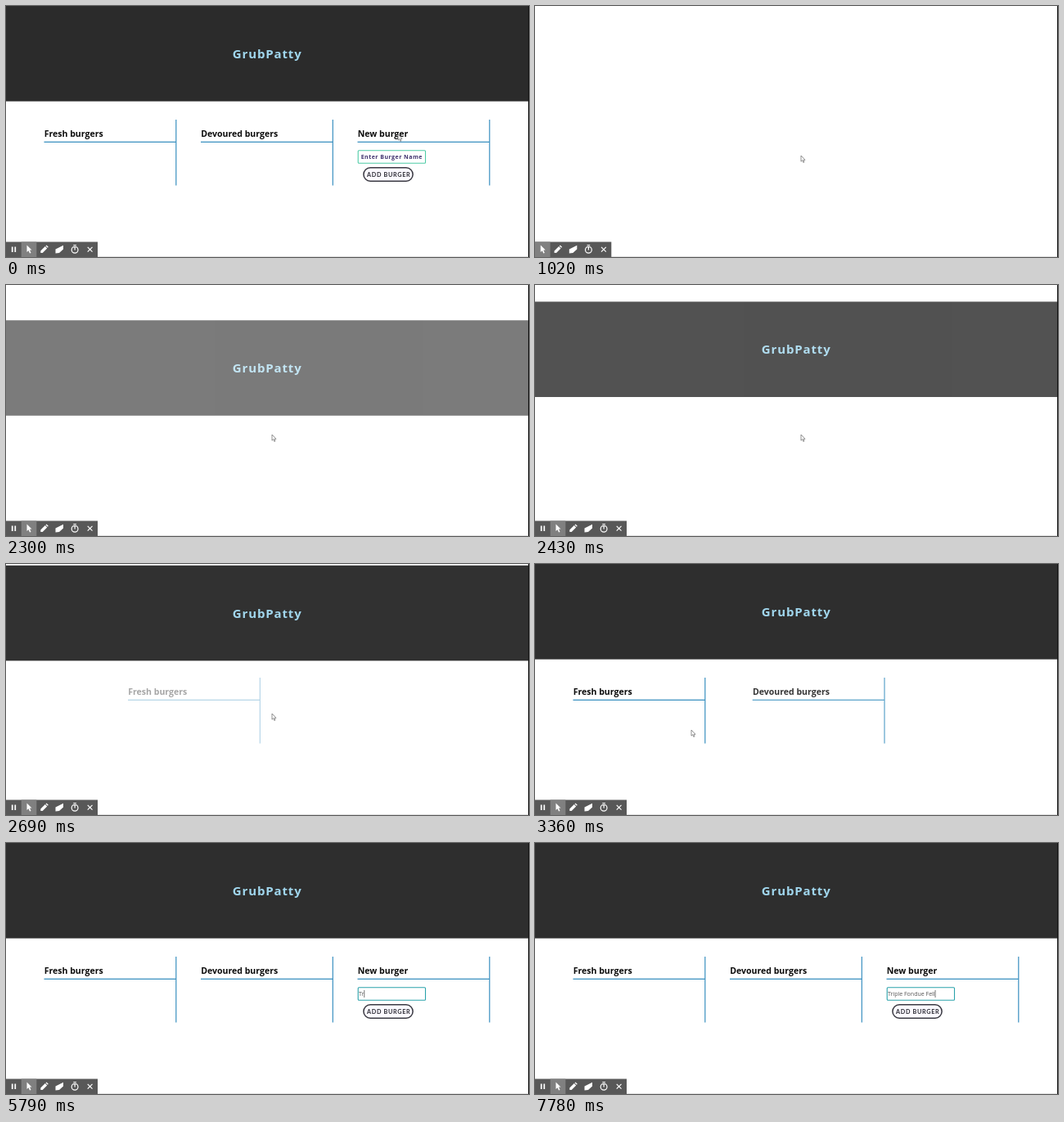
Animation of 639x307 px, one loop 8 s. Source, as an HTML page:

```html
<!DOCTYPE html>
<html lang="en">
<head>
<meta charset="utf-8">
<title>Burger list</title>
<style>
  html, body { margin: 0; height: 100%; overflow: hidden; background: #fff; }
  svg { display: block; width: 100vw; height: 100vh; }
  text { font-family: "Open Sans", "Noto Sans", sans-serif; white-space: pre; }
  .title { font-size: 15px; font-weight: 700; letter-spacing: .85px; fill: #a0d6ed; text-anchor: middle; }
  .head { font-size: 10.55px; font-weight: 700; fill: #0c0c0c; }
  .hint { font-size: 7px; font-weight: 700; letter-spacing: .48px; fill: #40336f; }
  .button { font-family: Lato, sans-serif; font-size: 7.2px; font-weight: 700; letter-spacing: .72px; fill: #2b2a33; }
  .typed { font-size: 7.02px; fill: #555; }
  .rule { fill: none; stroke: #3a90c0; stroke-width: 1.2; }
  .icon { fill: none; stroke: #fff; stroke-width: 1.2; }
  .solid { fill: #fff; }
</style>
</head>
<body>
<svg viewBox="0 0 639 307" preserveAspectRatio="none">
  <rect width="639" height="307" fill="#fff"/>
  <g id="header">
    <rect id="band" width="639" height="116.6"/>
    <text class="title" x="319.2" y="64">GrubPatty</text>
  </g>
  <g class="col">
    <text class="head" x="46.7" y="159.6">Fresh burgers</text>
    <path class="rule" d="M46.5 166.3H208M207.8 139V219.5"/>
  </g>
  <g class="col">
    <text class="head" x="238.2" y="159.6">Devoured burgers</text>
    <path class="rule" d="M238 166.3H399.5M399.3 139V219.5"/>
  </g>
  <g class="col">
    <text class="head" x="429.7" y="159.6">New burger</text>
    <path class="rule" d="M429.5 166.3H591M590.8 139V219.5"/>
    <rect id="field" x="430.2" y="176.7" width="82.3" height="15.5" rx="1" fill="#fff" stroke-width="1.1"/>
    <text class="hint" id="hint" x="433.7" y="187.3">Enter Burger Name</text>
    <text class="typed" id="typed" x="431" y="187.2"></text>
    <rect id="caret" y="180" width=".8" height="9" fill="#555"/>
    <rect x="436.9" y="197.8" width="60.2" height="16.4" rx="8.2" fill="#fbf9ff" stroke="#3a3942" stroke-width="1.5"/>
    <text class="button" x="441" y="208.7">ADD BURGER</text>
  </g>
  <path d="M0 306.5H638" stroke="#e2e2e2"/>
  <path d="M638.5 0V307" stroke="#111"/>
  <g id="toolbar">
    <rect x="-20" y="288.5" width="132" height="18.5" fill="#585858"/>
    <rect x="18.7" y="288.5" width="18.6" height="18.5" fill="#808080"/>
    <path class="icon" style="stroke-width:1.7" d="M7.7 294.5V301M11.3 294.5V301"/>
    <path class="solid" d="M25.5 292.5L31.5 298.5H29L30.5 302L29 302.6L27.6 299.2L25.5 301Z"/>
    <path class="solid" d="M42.3 302V299.6L47.8 294.1L50.2 296.5L44.7 302ZM48.5 293.4L49.5 292.5L51.8 294.8L50.9 295.8Z"/>
    <path class="solid" d="M60.5 297.5L70 292.8V297.5L65 302L60.5 302.5Z"/>
    <path class="icon" d="M82.3 292.5H85.9M84.1 295V298.5"/>
    <circle class="icon" cx="84.1" cy="298.2" r="3.9"/>
    <path class="icon" d="M99.7 294.8L105.5 300.6M105.5 294.8L99.7 300.6"/>
  </g>
  <path id="pointer" d="M0 0V7.2L1.7 5.7L2.8 8.4L4 7.9L2.9 5.3H5Z" fill="#fff" stroke="#777" stroke-width=".8"/>
</svg>
<script>
const LOOP = 8000, RELOAD = 1020, READY = 2170, FOCUS = 4790, HIDE = 5100;
const STEP = 130; // the page is refreshed once per step
const PHRASE = 'Triple Fondue Fell';
const $ = id => document.getElementById(id);
const cols = document.querySelectorAll('.col');

// [time, x, y]
const route = [
  [0, 479, 157], [350, 450, 204], [610, 397, 212], [870, 325, 183], [2950, 325, 183],
  [3340, 191, 203], [3860, 419, 195], [4510, 486, 192], [4640, 442, 192], [4770, 466, 183]
];
// [time, letters typed]
const typing = [[FOCUS, 0], [5410, 1], [5790, 2], [6780, 12], [7110, 15], [7780, 18]];

// Values at time t on straight lines between key points
function along(points, t) {
  const next = points.findIndex(p => p[0] > t);
  if (next < 0) return points.at(-1).slice(1);
  const b = points[next], a = points[Math.max(next - 1, 0)];
  const p = a === b ? 0 : (t - a[0]) / (b[0] - a[0]);
  return a.slice(1).map((v, i) => v + (b[i + 1] - v) * p);
}

// cubic-bezier(.25, .1, .25, 1)
function ease(p) {
  if (p <= 0) return 0;
  if (p >= 1) return 1;
  const curve = (a, b, u) => 3 * a * u * (1 - u) ** 2 + 3 * b * u * u * (1 - u) + u ** 3;
  let lo = 0, hi = 1;
  for (let i = 0; i < 20; i++) {
    const mid = (lo + hi) / 2;
    if (curve(.25, .25, mid) < p) lo = mid; else hi = mid;
  }
  return curve(.1, 1, lo);
}

function place(el, dx, dy, opacity = 1) {
  el.setAttribute('transform', `translate(${dx} ${dy})`);
  el.setAttribute('opacity', opacity);
}

function draw(t) {
  const before = t < RELOAD, focused = t >= FOCUS;
  const tick = READY + Math.floor((t - READY) / STEP) * STEP;
  const entered = (start, length) =>
    before ? 1 : t < READY ? 0 : ease((tick - start) / length);

  const rise = entered(2000, 820);
  place($('header'), 0, 117 * (1 - rise), rise);
  $('band').setAttribute('fill', before ? '#2b2b2b' : '#2e2e2e');

  cols.forEach((col, i) => {
    const slide = entered(2520 + 430 * i, 740);
    place(col, 161 * (1 - slide), 0, slide);
  });

  place($('toolbar'), !before && t < READY ? -18.7 : 0, 0);

  $('field').setAttribute('stroke', focused ? '#2ba3ab' : '#4fcba6');
  $('hint').setAttribute('opacity', focused ? 0 : 1);
  const count = Math.floor(along(typing, t)[0]);
  const text = $('typed');
  text.textContent = PHRASE.slice(0, count);
  $('caret').setAttribute('x', 431 + (count ? text.getComputedTextLength() : 0));
  $('caret').setAttribute('opacity', focused ? 1 : 0);

  const [x, y] = along(route, Math.max(tick, 0));
  place($('pointer'), x, y, t < HIDE ? 1 : 0);
}

const begin = performance.now();
function frame() {
  draw((performance.now() - begin) % LOOP);
  requestAnimationFrame(frame);
}
frame();
</script>
</body>
</html>
```
